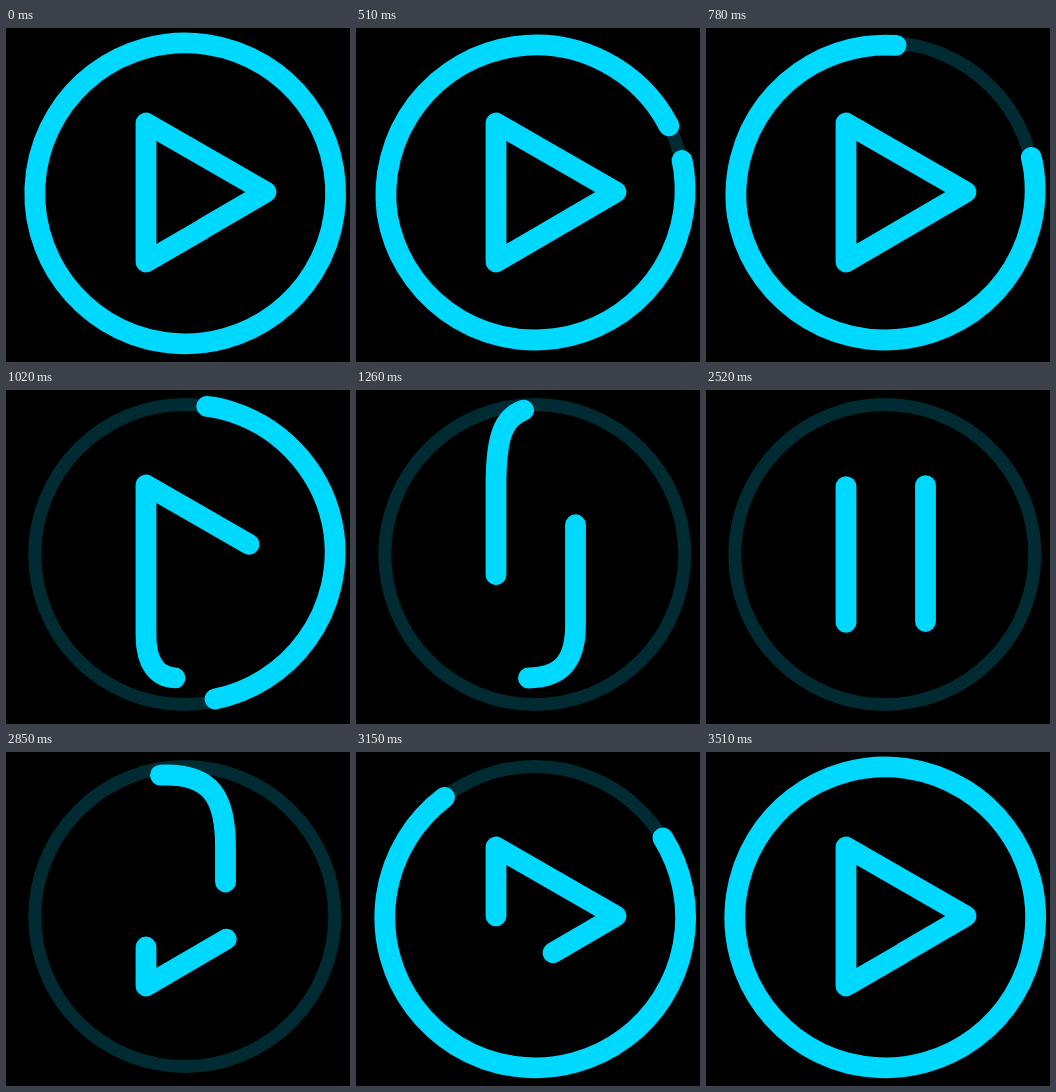
Animation of 344 by 334 pixels, one loop 4.47 s. Source, as an HTML page:

```html
<!DOCTYPE html>
<html lang="en">
<head>
<meta charset="utf-8">
<title>Play and pause</title>
<style>
  html, body { margin: 0; width: 100%; height: 100%; overflow: hidden; background: #000; }
  svg { display: block; width: 100vw; height: 100vh; }
  path, circle { fill: none; stroke: #00d9ff; stroke-width: 20.8; stroke-linecap: round; stroke-linejoin: round; }
  circle { stroke: #002b33; stroke-width: 13; }
</style>
</head>
<body>
<svg viewBox="0 0 344 334">
  <circle cx="178.8" cy="164.6" r="150"/>
  <g id="toPause">
    <path d="M327.9 142.8A150 150 0 0 0 31.1 186.2A150 150 0 0 0 327.9 142.8A150 150 0 0 0 225.9 21.8
             C205 15 188 14 168 20C148 27 140 45 140 95V232"/>
    <path d="M140 164V234L260 164L140 95V245C140 275 152 288 171 288C205 288 219.5 272 219.5 235V96"/>
  </g>
  <g id="toPlay">
    <path d="M219.5 232V95C219.5 45 205 23 160 23C130 23 108 31 89 45
             A150.4 150.4 0 0 0 269.4 285.8A150.4 150.4 0 0 0 89 45"/>
    <path d="M140 96V234L260 164L140 95V234L197 201"/>
  </g>
</svg>
<script>
const LOOP = 4470, STEP = 30, PAUSE_AT = 300, PLAY_AT = 2520;
const BAR = 136, RING = 942.5, TRI = 416.3;
const toPause = document.getElementById('toPause');
const toPlay = document.getElementById('toPlay');

// Smooth monotone curve through [time, distance] keys, at rest at both ends.
function track(keys) {
  const rate = i => (keys[i + 1][1] - keys[i][1]) / (keys[i + 1][0] - keys[i][0]);
  const slope = keys.map((k, i) => {
    if (i === 0 || i === keys.length - 1) return 0;
    const a = rate(i - 1), b = rate(i);
    return a * b > 0 ? 2 * a * b / (a + b) : 0;
  });
  return t => {
    if (t <= keys[0][0]) return keys[0][1];
    for (let i = 0; i < keys.length - 1; i++) {
      const [t0, a] = keys[i], [t1, b] = keys[i + 1];
      if (t > t1) continue;
      const h = t1 - t0, u = (t - t0) / h, v = 1 - u;
      return a * v * v * (1 + 2 * u) + b * u * u * (3 - 2 * u)
        + h * u * v * (slope[i] * v - slope[i + 1] * u);
    }
    return keys[keys.length - 1][1];
  };
}

// A stroke is the part of a path between its tail and its head.
function stroke(path, tailKeys, headKeys) {
  const len = path.getTotalLength();
  const tail = track(tailKeys(len)), head = track(headKeys(len));
  return t => {
    const a = tail(t);
    path.style.strokeDasharray = `${head(t) - a} ${len + 100}`;
    path.style.strokeDashoffset = -a;
  };
}

const pauseStrokes = [
  stroke(toPause.children[0],
    L => [[300, 0], [780, 201], [810, 248], [1260, L - BAR - 87], [1350, L - BAR - 22], [1830, L - BAR]],
    L => [[750, RING], [1260, L - 48], [1380, L - 9], [1830, L]]),
  stroke(toPause.children[1],
    L => [[780, 0], [1260, L - BAR - 85], [1380, L - BAR - 5], [1830, L - BAR]],
    L => [[780, TRI], [1260, L - 39], [1380, L - 7], [1830, L]])
];
const playStrokes = [
  stroke(toPlay.children[0],
    L => [[2500, 0], [2850, 102], [3090, L - 945]],
    L => [[2500, BAR], [2850, 251], [3030, 696], [3150, L - 250], [3510, L]]),
  stroke(toPlay.children[1],
    L => [[2500, 0], [2850, 99], [3100, L - TRI]],
    L => [[2500, BAR], [2850, 231], [3150, L - BAR], [3510, L]])
];

function draw(now) {
  let t = Math.floor((now % LOOP) / STEP) * STEP;
  const pausing = t >= PAUSE_AT && t < PLAY_AT;
  if (t < PAUSE_AT) t += LOOP;
  toPause.style.display = pausing ? '' : 'none';
  toPlay.style.display = pausing ? 'none' : '';
  (pausing ? pauseStrokes : playStrokes).forEach(set => set(t));
}

const start = performance.now();
function tick() {
  draw(performance.now() - start);
  requestAnimationFrame(tick);
}
tick();
</script>
</body>
</html>
```
